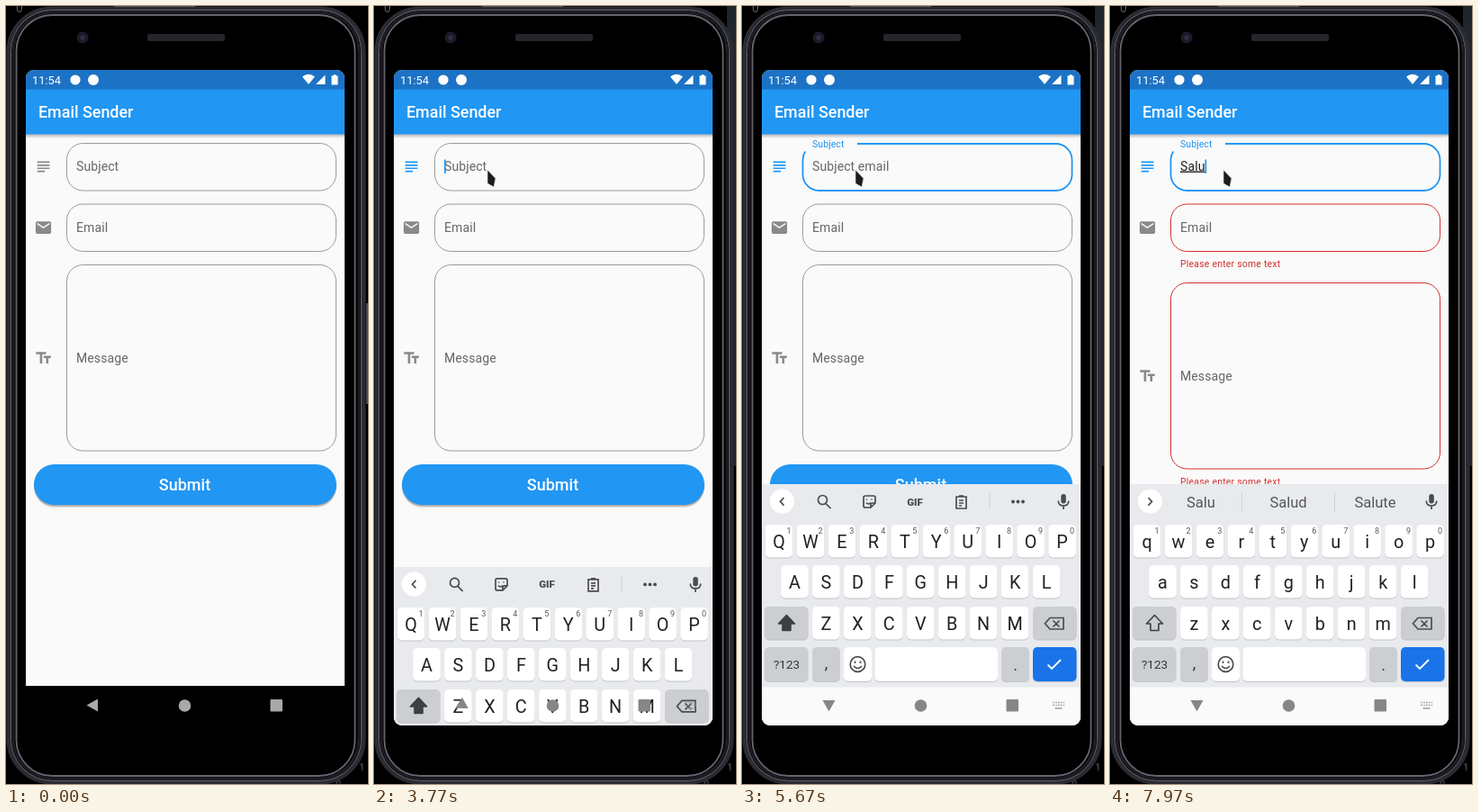
Recreate the animation shown at these times as an HTML page. Size 402 px wide and 864 px high, loop 8000 ms.

```html
<!DOCTYPE html>
<html lang="en">
<head>
<meta charset="utf-8">
<title>Email form</title>
<style>
  html, body { margin: 0; width: 100%; height: 100%; overflow: hidden; background: #000; }
  svg { display: block; width: 402px; height: 864px; font-family: Roboto, sans-serif; }
  text { white-space: pre; }
  .body { font-size: 14px; letter-spacing: .1px; fill: #666; }
  .error { font-size: 10.4px; letter-spacing: .25px; fill: #d32f2f; }
  .mid { text-anchor: middle; }
  .line { fill: none; stroke: #4a4c50; stroke-width: 1.7; }
  .field { fill: none; stroke: #9a9a9a; }
</style>
</head>
<body>
<svg id="stage" viewBox="0 0 402 864">
  <defs>
    <clipPath id="screen"><rect x="22" y="71" width="354" height="728" rx="9"/></clipPath>
    <linearGradient id="shade" x2="0" y2="1">
      <stop stop-color="#666" stop-opacity=".5"/><stop offset="1" stop-color="#666" stop-opacity="0"/>
    </linearGradient>
  </defs>

  <rect width="402" height="864"/>
  <rect x="120" width="90" height="1.500" fill="#8a8a8a"/>
  <rect id="sideOld" x="400" y="330" width="2" height="112" fill="#4a4c58"/>
  <rect id="sideNew" x="392" width="10" height="511" fill="#20262c"/>
  <g fill="#5a5a5a" font-size="14"><text x="11" y="7">0</text><text x="392" y="849" font-size="11">1</text><text x="366" y="868" font-size="11">0</text></g>

  <!-- Phone shell -->
  <rect x="3" y="3" width="394" height="859" rx="48" fill="#000" stroke="#2b2b33" stroke-width="5"/>
  <rect x="5.500" y="4.500" width="389" height="856" rx="46" fill="none" stroke="#64646e"/>
  <rect x="8" y="7" width="384" height="851" rx="44" fill="none" stroke="#1c1c22" stroke-width="3"/>
  <rect x="11.500" y="10" width="376" height="845" rx="40" fill="#000" stroke="#66666f" stroke-width="1.800"/>
  <circle cx="85" cy="35" r="6.500" fill="#1b1c28"/><circle cx="85" cy="35" r="2.500" fill="#2c3048"/>
  <rect x="157" y="31" width="86" height="8" rx="2" fill="#25252a"/>

  <g clip-path="url(#screen)">
    <rect x="22" y="71" width="354" height="684" fill="#fafafa"/>

    <g id="form">
      <path id="subjectIcon" transform="translate(31.2 168.200) scale(.861)" d="M14 17H4v2h10v-2zm6-8H4v2h16V9zM4 15h16v-2H4v2zM4 5v2h16V5H4z"/>
      <rect id="subjectBox" class="field" x="67.500" y="152.500" width="299" height="52.500" rx="18"/>
      <path id="focusBox" fill="none" stroke="#2196f3" stroke-width="1.800" d="M128 153H348.500a18 18 0 0 1 18 18v16a18 18 0 0 1-18 18H85.500a18 18 0 0 1-18-18V171a18 18 0 0 1 2.800-9.600"/>
      <text id="hint" class="body" x="78" y="183">Subject email</text>
      <text id="label" class="body">Subject</text>
      <text id="typed" class="body" x="78" y="182.500" style="fill:#202020"></text>
      <rect id="caret" y="170.500" width="1.700" height="15.500" fill="#2196f3"/>

      <path transform="translate(31.2 235.700) scale(.861)" fill="#898989" d="M20 4H4c-1.100 0-2 .9-2 2v12c0 1.100.9 2 2 2h16c1.100 0 2-.9 2-2V6c0-1.100-.9-2-2-2zm0 4l-8 5-8-5V6l8 5 8-5v2z"/>
      <rect class="field check" x="67.500" y="220" width="299" height="52.500" rx="18"/>
      <text class="body" x="78" y="251">Email</text>
      <text class="error" x="78" y="290">Please enter some text</text>

      <g id="message">
        <path transform="translate(31.2 380.700) scale(.861)" fill="#898989" d="M2.500 4v3h5v12h3V7h5V4h-13zm19 5h-9v3h3v7h3v-7h3V9z"/>
        <rect class="field check" x="67.500" y="287.500" width="299" height="206.500" rx="18"/>
        <text class="body" x="78" y="396">Message</text>
        <text class="error" x="78" y="511.500">Please enter some text</text>
      </g>
      <g id="submit">
        <rect x="31" y="512" width="336" height="45" rx="22.500" fill="#666" opacity=".2"/>
        <rect x="31" y="510.500" width="336" height="45" rx="22.500" fill="#666" opacity=".45"/>
        <rect x="31" y="509" width="336" height="45" rx="22.500" fill="#2196f3"/>
        <text class="mid" x="198.500" y="538" font-size="18" font-weight="500" fill="#fff">Submit</text>
      </g>
    </g>

    <!-- Status and title bars -->
    <rect x="22" y="142" width="354" height="5" fill="url(#shade)"/>
    <rect x="22" y="92" width="354" height="50.500" fill="#2196f3"/>
    <rect x="22" y="71" width="354" height="21.500" fill="#1c72c4"/>
    <g fill="#fff">
      <text x="36" y="124.300" font-size="17.900" font-weight="500">Email Sender</text>
      <text x="29" y="86.500" font-size="12.800">11:54</text>
      <circle cx="77" cy="82" r="5.600"/><circle cx="97" cy="82" r="6"/>
      <path d="M329 78.500q7-5.500 14 0l-7 8.500zM354.500 76.500V87H344zM361.500 77.500h2v-1.300h3v1.300h2V87.500h-7z"/>
    </g>

    <rect x="22" y="755" width="354" height="44"/>
    <rect id="navLight" x="22" y="755" width="354" height="44" fill="#fafafa"/>
    <g id="keyboard"></g>
    <g id="nav">
      <path id="back" d="M89.500 776.500l12.500-7v14z"/>
      <circle cx="198.500" cy="777" r="6.800"/>
      <rect x="293.500" y="770" width="13.500" height="13.500" rx="1"/>
      <g id="imeIcon">
        <path fill="none" stroke="#a0a0a0" stroke-width="1.600" stroke-dasharray="1.800 1.200" d="M345 773.500h13M345 776.500h13"/>
        <path fill="none" stroke="#a0a0a0" stroke-width="1.500" d="M347.500 780h8"/>
      </g>
    </g>
  </g>

  <path id="pointer" fill="#1c1c1c" stroke="#eee" stroke-width=".6" d="M0 0L9 9.500 7 19 0 15z"/>
</svg>

<script>
const LOOP = 8000;
const $ = id => document.getElementById(id);
const clamp = v => Math.max(0, Math.min(1, v));
const ramp = (t, from, length) => clamp((t - from) / length);
const easeOut = u => 1 - (1 - u) ** 3;
const easeInOut = u => u * u * (3 - 2 * u);
const lerp = (a, b, u) => a + (b - a) * u;
const mix = (a, b, u) => `rgb(${a.map((v, i) => Math.round(lerp(v, b[i], u)))})`;
const set = (el, attrs) => { for (const k in attrs) el.setAttribute(k, attrs[k]); };
const show = (el, on) => set(el, { opacity: +on });

const ENTER = 2700, KEYS_IN = 3690, FOCUS = 3760, FLOAT = 3935, FIRST = 6470;
const TYPING = [
  { at: FIRST, text: "S", words: ["S", "So", "See"] },
  { at: 6900, text: "Sa", words: ["Sa", "Say", "Same"] },
  { at: 7270, text: "Sal", words: ["Sal", "Sale", "Salt"] },
  { at: 7670, text: "Salu", words: ["Salu", "Salud", "Salute"] }
];
const PITCH = 34.95;

function keyBox(x, y, w, fill = "#fff", h = 36.5) {
  return `<rect x="${x}" y="${y + 1}" width="${w}" height="${h}" rx="5" fill="#b4b6ba" opacity=".7"/>
    <rect x="${x}" y="${y}" width="${w}" height="${h}" rx="5" fill="${fill}"/>`;
}

function letterRow(letters, x, y, digits) {
  return [...letters].map((c, i) => {
    const cx = x + i * PITCH;
    const digit = digits
      ? `<text class="mid" x="${cx + 11}" y="${y + 10}" font-size="9" fill="#55575b">${(i + 1) % 10}</text>` : "";
    return keyBox(cx - 15.3, y, 30.6) + digit +
      `<text class="mid letter" x="${cx}" y="${y + 26}" font-size="19.800" fill="#202124">${c}</text>`;
  }).join("");
}

function buildKeyboard() {
  const dim = "#ccced2";
  $("keyboard").innerHTML = `
    <rect x="22" y="531" width="354" height="226" fill="#e8eaed"/>
    <rect x="22" y="756.500" width="354" height="43" fill="#fafafa"/>
    <circle cx="44.500" cy="550" r="13.500" fill="#fff"/>
    <path id="chevron" class="line"/>
    <g id="tools" class="line">
      <circle cx="89.500" cy="548.500" r="5"/><path d="M93 552.500l5.500 5.500"/>
      <path d="M137 544h9q2 0 2 2v6l-5 5h-6q-2 0-2-2v-9q0-2 2-2zM148 552h-3q-2 0-2 2v3M138 551.500q2.500 3 5 0M138.500 547.500v1M144 547.500v1"/>
      <path d="M238 545h11v13h-11zM241 549h5M241 552h5M241 555h3M241 544h5"/>
      <path d="M275 541v18" stroke="#d0d2d6" stroke-width="1"/>
      <text class="mid" x="192" y="554.500" font-size="11.500" font-weight="900" stroke="none" fill="#4a4c50">GIF</text>
      <g fill="#4a4c50" stroke="none"><circle cx="301" cy="550.500" r="1.900"/><circle cx="306.500" cy="550.500" r="1.900"/><circle cx="312" cy="550.500" r="1.900"/></g>
    </g>
    <g id="words" font-size="16.500" fill="#55575b">
      <path d="M146.500 541v20M249.500 541v20" stroke="#d0d2d6"/>
      ${[101, 198, 294.5].map(x => `<text class="mid" x="${x}" y="557"></text>`).join("")}
    </g>
    <rect x="354.300" y="542" width="5.500" height="10.500" rx="2.700" fill="#4a4c50"/>
    <path class="line" d="M351.300 549.500q0 5.500 5.700 5.500t5.700-5.500M357 555v4"/>
    ${letterRow("QWERTYUIOP", 41, 576, true)}
    ${letterRow("ASDFGHJKL", 58.5, 621)}
    ${letterRow("ZXCVBNM", 93.4, 667)}
    ${keyBox(25, 667, 48.500, dim)}
    <path id="shift" stroke="#3c4043" stroke-width="1.600" stroke-linejoin="round" d="M49.500 676.500l9 9.500h-4.500v7.500h-9v-7.500h-4.500z"/>
    ${keyBox(323, 667, 48.500, dim)}
    <path class="line" d="M342 679.500h15v12.500h-15l-5.500-6.200zM345.500 682.500l7 7M352.500 682.500l-7 7"/>
    ${keyBox(25, 712, 48.500, dim, 38)}${keyBox(78, 712, 31, dim, 38)}
    ${keyBox(113, 712, 31, "#fff", 38)}${keyBox(147.5, 712, 136.500, "#fff", 38)}
    ${keyBox(288, 712, 31, dim, 38)}${keyBox(323, 712, 48.500, "#1a73e8", 38)}
    <g class="mid" fill="#34363a">
      <text x="49.500" y="736" font-size="13.500">?123</text>
      <text x="93.500" y="736" font-size="18">,</text><text x="303.500" y="738" font-size="18">.</text>
    </g>
    <g class="line"><circle cx="128.500" cy="731" r="8.300"/><path d="M124 733q4.500 5 9 0M125.500 727.500v2.500M131.500 727.500v2.500"/></g>
    <path fill="none" stroke="#fff" stroke-width="1.800" d="M339.500 731.500l4.500 4.500 10-10"/>`;
}

function drawPointer(t) {
  const u = easeOut(ramp(t, ENTER, 470));
  set($("pointer"), { transform: `translate(${lerp(404, 126, u)} ${lerp(420, 182, u)})` });
  show($("sideOld"), t < ENTER);
  show($("sideNew"), t >= ENTER);
}

function drawKeyboard(t, step) {
  const open = t >= KEYS_IN;
  const lower = t >= FIRST;
  const suggest = t >= FIRST + 150;
  set($("keyboard"), {
    transform: `translate(0 ${268 * (1 - easeOut(ramp(t, KEYS_IN, 270)))})`,
    visibility: open ? "visible" : "hidden"
  });
  show($("navLight"), open);
  show($("imeIcon"), open);
  set($("nav"), { fill: open ? "#868686" : "#a9a9a9" });
  set($("back"), { transform: `rotate(${-90 * ramp(t, KEYS_IN, 253)} 96.500 776.500)` });
  for (const el of document.querySelectorAll(".letter")) {
    el.textContent = lower ? el.textContent.toLowerCase() : el.textContent.toUpperCase();
  }
  set($("shift"), { fill: lower ? "none" : "#3c4043" });
  set($("chevron"), { d: suggest ? "M42.500 546l4 4.300-4 4.300" : "M46.500 546l-4 4.300 4 4.300" });
  show($("tools"), !suggest);
  show($("words"), suggest);
  $("words").querySelectorAll("text").forEach((el, i) => el.textContent = step ? step.words[i] : "");
}

function drawForm(t, step) {
  const lift = easeInOut(ramp(t, FLOAT, 170));
  const fail = ramp(t, FIRST + 40, 170);
  const focused = t >= FOCUS;
  const blue = [33, 150, 243], gray = [102, 102, 102];

  set($("subjectIcon"), { fill: focused ? "#2196f3" : "#898989" });
  show($("subjectBox"), lift === 0);
  set($("focusBox"), { opacity: lift });
  set($("label"), {
    transform: `translate(78 ${lerp(183, 157.2, lift)}) scale(${lerp(1, .75, lift)})`,
    style: `fill:${mix(gray, blue, lift)}`
  });
  set($("hint"), { opacity: ramp(t, FLOAT + 90, 150) * (1 - ramp(t, FIRST + 30, 150)) });

  const typed = $("typed");
  typed.textContent = step ? step.text : "";
  typed.style.textDecoration = t >= FIRST + 90 ? "underline" : "none";
  const width = step ? typed.getComputedTextLength() : 0;
  const since = t - (step ? step.at : FOCUS);
  set($("caret"), { x: 78 + width });
  show($("caret"), focused && since % 1000 < 500);

  const push = t >= FIRST ? 20 : 0;
  set($("message"), { transform: `translate(0 ${push})` });
  set($("submit"), { transform: `translate(0 ${2 * push})` });
  for (const el of document.querySelectorAll(".error")) set(el, { opacity: fail });
  for (const el of document.querySelectorAll(".check")) {
    el.style.stroke = mix([154, 154, 154], [211, 47, 47], fail);
  }
}

function draw(t) {
  const step = TYPING.filter(s => t >= s.at).pop();
  drawPointer(t);
  drawKeyboard(t, step);
  drawForm(t, step);
}

buildKeyboard();
const start = performance.now();
function tick() {
  draw((performance.now() - start) % LOOP);
  requestAnimationFrame(tick);
}
tick();
</script>
</body>
</html>
```
